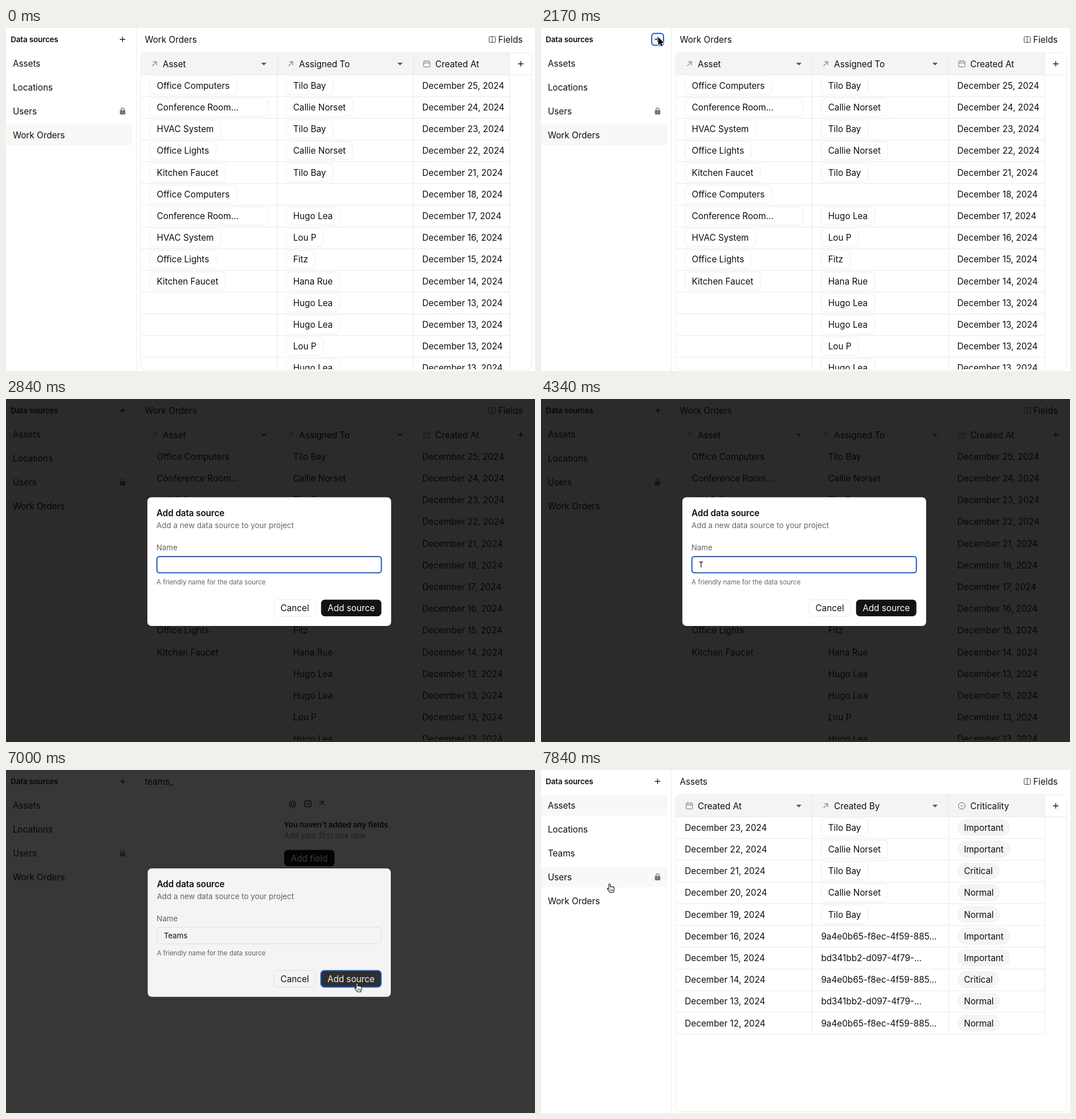
An HTML page with a canvas that plays this animation: 928x603 px, repeating every 8 s.

```html
<!DOCTYPE html>
<html lang="en">
<head>
<meta charset="utf-8">
<title>Data sources</title>
<style>
  html, body { margin: 0; width: 100%; height: 100%; overflow: hidden; background: #fff; }
  canvas { display: block; width: 928px; height: 603px; }
</style>
</head>
<body>
<canvas id="stage"></canvas>
<script>
const W = 928, H = 603, LOOP = 8000;
const dpr = window.devicePixelRatio || 1;
const BODY = 15.28, SMALL = 13.37, TINY = 11.46;
const INK = '#0e0e0d', GRAY = '#656563', ICON = '#737371', LINE = '#efefed', BLUE = '#1b59cc';
const COLS = [236.8, 475.9, 714.8, 883.5];
const TOP = 82, ROW = 38.2, PAD = 15.5, FIRST = 101.2;
const DIM = 0.83, EDGE = 264.1;

const stage = document.getElementById('stage');
const layer = document.createElement('canvas');
for (const c of [stage, layer]) { c.width = W * dpr; c.height = H * dpr; }
const main = stage.getContext('2d'), modal = layer.getContext('2d');
let g = main;

const ASSETS = ['Office Computers', 'Conference Room…', 'HVAC System', 'Office Lights', 'Kitchen Faucet'];
const [P1, P2, P3, P4, P5, P6] = ['Tilo Bay', 'Callie Norset', 'Hugo Lea', 'Lou P', 'Fitz', 'Hana Rue'];
const PEOPLE = [P1, P2, P1, P2, P1, '', P3, P4, P5, P6, P3, P3, P4, P3];
const ORDER_DAYS = [25, 24, 23, 22, 21, 18, 17, 16, 15, 14, 13, 13, 13, 13];
const ASSET_DAYS = [23, 22, 21, 20, 19, 16, 15, 14, 13, 12];
const IDS = ['9a4e0b65-f8ec-4f59-885…', 'bd341bb2-d097-4f79-…'];
const LEVELS = ['Important', 'Important', 'Critical', 'Normal', 'Normal'];
const date = d => `December ${d}, 2024`;

// y is the middle of the capitals
function text(s, x, y, size = BODY, color = INK, weight = 400) {
  g.font = `${weight} ${size}px Inter, sans-serif`;
  g.fillStyle = color;
  g.fillText(s, x, y + size * 0.364);
  return g.measureText(s).width;
}

function widthOf(s) {
  g.font = `400 ${BODY}px Inter, sans-serif`;
  return g.measureText(s).width;
}

function heading(s, x, y, size) {
  g.letterSpacing = '-0.12px';
  text(s, x, y, size, INK, 600);
  g.letterSpacing = '0px';
}

function box(x, y, w, h, r, fill, stroke, lw = 1) {
  g.beginPath();
  g.roundRect(x, y, w, h, r);
  if (fill) { g.fillStyle = fill; g.fill(); }
  if (stroke) { g.strokeStyle = stroke; g.lineWidth = lw; g.stroke(); }
}

function lines(color, lw, ...paths) {
  g.strokeStyle = color;
  g.lineWidth = lw;
  g.beginPath();
  for (const [x, y, ...rest] of paths) {
    g.moveTo(x, y);
    for (let i = 0; i < rest.length; i += 2) g.lineTo(rest[i], rest[i + 1]);
  }
  g.stroke();
}

function circle(x, y, r, color, lw = 1) {
  g.strokeStyle = color;
  g.lineWidth = lw;
  g.beginPath();
  g.arc(x, y, r, 0, Math.PI * 2);
  g.stroke();
}

const plus = (x, y) => lines('#222', 1.4, [x - 4.8, y, x + 4.8, y], [x, y - 4.8, x, y + 4.8]);

const icons = {
  link: (x, y, c = ICON) =>
    lines(c, 1.05, [x - 3.8, y + 3.8, x + 3.8, y - 3.8], [x - 2.6, y - 3.8, x + 3.8, y - 3.8, x + 3.8, y + 2.6]),
  calendar(x, y) {
    box(x - 5.5, y - 4.7, 11, 10.2, 1.4, null, ICON);
    lines(ICON, 1, [x - 5.5, y - 1.5, x + 5.5, y - 1.5], [x - 2.8, y - 6.3, x - 2.8, y - 3.5], [x + 2.8, y - 6.3, x + 2.8, y - 3.5]);
  },
  choice(x, y) {
    circle(x, y, 5.8, GRAY);
    lines(GRAY, 1, [x - 2.4, y - 1, x, y + 1.4, x + 2.4, y - 1]);
  }
};

function lock(x, y) {
  box(x - 4.8, y - 1.6, 9.6, 7.6, 1.4, ICON);
  g.strokeStyle = ICON;
  g.lineWidth = 1.3;
  g.beginPath();
  g.moveTo(x - 2.8, y - 1);
  g.lineTo(x - 2.8, y - 2.6);
  g.arc(x, y - 2.6, 2.8, Math.PI, 0);
  g.lineTo(x + 2.8, y - 1);
  g.stroke();
  lines('#bbb', 1, [x, y + 1, x, y + 3.4]);
}

function sidebar(items, active, hover, ring) {
  lines('#ececea', 1, [228.5, 0, 228.5, H]);
  heading('Data sources', 8.2, 20, SMALL);
  if (ring) box(194.2, 9.4, 20.8, 21.2, 5, '#f5f5f4', BLUE, 2);
  plus(204.5, 20);
  items.forEach((name, i) => {
    const y = 62 + 42 * i;
    if (name === active || name === hover) box(-8, y - 18.3, 230.4, 36.5, 5.5, '#f8f8f7');
    text(name, 11.9, y);
    if (name === 'Users') lock(204.5, y);
  });
}

function pill(s, x, y) {
  if (!s) return;
  const w = s.startsWith('Conf') ? 207.4 : widthOf(s) + 24.4;
  box(x + 0.2, y - 16.2, w, 32, 7.5, '#fff', '#ededeb');
  text(s, x + 12.3, y);
}

function tag(s, x, y) {
  box(x + 0.4, y - 15.2, widthOf(s) + 22.6, 30, 15, '#f4f4f3');
  text(s, x + 11.6, y);
}

const plain = (s, x, y) => text(s, x, y);

// columns: [icon, title, cell painter, value of row i]
function table(title, columns, rows) {
  text(title, 243.4, 20);
  box(847.5, 15, 11, 10.4, 1.6, null, '#444');
  lines('#444', 1, [853, 15, 853, 25.4]);
  text('Fields', 863.6, 20);

  g.save();
  g.beginPath();
  g.roundRect(236.5, 43.5, 685.5, 557, 7);
  g.clip();
  g.fillStyle = '#f4f4f3';
  g.fillRect(236, 43, COLS[3] - 236, TOP - 43);
  const end = TOP + ROW * rows;
  for (let i = 0; i <= rows; i++) {
    const y = TOP + ROW * i + 0.3;
    lines(LINE, 1.5, [236, y, i ? COLS[3] : 922, y]);
  }
  for (const x of COLS.slice(1)) lines(LINE, 1.5, [x, 43, x, end]);
  lines('#e9e9e7', 1, [COLS[1], 43, COLS[1], TOP], [COLS[2], 43, COLS[2], TOP]);

  columns.forEach(([icon, head, paint, value], c) => {
    const x = COLS[c];
    icons[icon](x + 23.4, 63);
    text(head, x + 38.2, 63);
    if (c < 2) {
      const tx = COLS[c + 1] - 23.6;
      g.fillStyle = '#5c5c5a';
      g.beginPath();
      g.moveTo(tx - 4.8, 61);
      g.lineTo(tx + 4.8, 61);
      g.lineTo(tx, 65.8);
      g.fill();
    }
    for (let i = 0; i < rows; i++) paint(value(i), x + PAD, FIRST + ROW * i);
  });
  plus(903, 63);
  g.restore();
  box(236.5, 43.5, 685.5, 557, 7, null, '#ebebe9');
}

const pages = {
  orders: () => table('Work Orders', [
    ['link', 'Asset', pill, i => i < 10 ? ASSETS[i % 5] : ''],
    ['link', 'Assigned To', pill, i => PEOPLE[i]],
    ['calendar', 'Created At', plain, i => date(ORDER_DAYS[i])]
  ], 14),
  assets: () => table('Assets', [
    ['calendar', 'Created At', plain, i => date(ASSET_DAYS[i])],
    ['link', 'Created By', (s, x, y) => (s.includes('-') ? plain : pill)(s, x, y), i => i < 5 ? PEOPLE[i] : IDS[(i - 5) % 2]],
    ['choice', 'Criticality', tag, i => LEVELS[i % 5]]
  ], 10),
  teams() {
    text('teams_', 243.4, 20);
    text('@', 495.8, 59, 14.5);
    box(524, 53.8, 11, 10.8, 2, null, INK, 1.2);
    lines(INK, 1.2, [526.6, 59.2, 528.8, 61.4, 532.6, 56.8]);
    icons.link(553, 59, INK);
    heading("You haven't added any fields", 487.6, 96, SMALL);
    text('Add your first one now', 487.6, 115, SMALL, GRAY);
    box(488, 140.5, 88.4, 28.7, 6.5, '#101010');
    text('Add field', 499.6, 155, BODY, '#fff');
  }
};

const panel = fill => box(248, 172.8, 427.6, 226.2, 7, fill);

function dialog(value, caret, focused, hover, pressed) {
  panel('#fff');
  heading('Add data source', EDGE, 200.2, BODY);
  text('Add a new data source to your project', EDGE, 222.2, SMALL, GRAY);
  text('Name', EDGE - 0.3, 261.4, SMALL, GRAY);
  if (focused) box(264.7, 277, 393.8, 28.6, 4.5, '#fff', BLUE, 2);
  else box(264.5, 276.5, 394, 29.2, 5, null, '#e8e8e6');
  const w = text(value, 276.4, 291.2, SMALL);
  if (caret) lines('#111', 1, [277 + w, 283, 277 + w, 299]);
  text('A friendly name for the data source', EDGE, 321.6, TINY, GRAY);
  box(470.3, 352.7, 73.4, 29.2, 6.5, '#fff', '#e9e9e7');
  text('Cancel', 481.6, 367.3);
  box(552.7, 352.8, 105.8, 29.2, 6.5, hover ? '#2f2f2e' : '#131312');
  if (pressed) box(552.7, 353, 105.8, 28.8, 6, null, BLUE, 2);
  text('Add source', 564.2, 367.3, BODY, '#fff');
}

const ARROW = new Path2D('M0 0V14.4L3.3 11.4L5.4 16.4L7.7 15.4L5.6 10.5H10Z');
const HAND = new Path2D('M3.5 10V2a1.3 1.3 0 0 1 2.6 0v4.3c.2-1.2 2.2-1.1 2.4.1c.4-1 2.2-.8 2.3.4c.5-.8 2-.4 2 .8v3.2c0 2.5-1.2 3-1.4 5.2H5.4C5 14.6 3 13 1.2 10.2C.2 8.6 1.8 7.6 3.5 10z');

function cursor(kind, x, y) {
  g.save();
  g.translate(x, y);
  g.lineJoin = 'round';
  if (kind === 'arrow') {
    g.strokeStyle = '#fff';
    g.lineWidth = 2;
    g.stroke(ARROW);
    g.fillStyle = '#000';
    g.fill(ARROW);
  } else {
    g.fillStyle = '#fff';
    g.fill(HAND);
    g.strokeStyle = '#111';
    g.lineWidth = 1.1;
    g.stroke(HAND);
    lines('#111', 0.9, [6.3, 10.5, 6.3, 13.5], [8.4, 10.5, 8.4, 13.5], [10.4, 10.5, 10.4, 13.5]);
  }
  g.restore();
}

// last entry whose start time has passed
const at = (list, t) => list.filter(e => e[0] <= t).pop();

const FADE = [[0, 0], [2340, 0.9], [2500, 1], [7000, 0.945], [7170, 0]];
const INPUT = [
  [0, '', 0], [2340, '', 1], [2840, '', 0], [3340, '', 1], [3840, 'T', 1], [4340, 'T', 0],
  [4500, 'Te', 1], [4840, 'Tea', 1], [5170, 'Team', 1], [5670, 'Teams', 1], [6170, 'Teams', 0]
];
const POINTER = [
  [0], [1840, 'arrow', 205.6, 15.8], [2670], [6000, 'arrow', 555, 307], [6170, 'arrow', 574, 332],
  [6340, 'hand', 601, 362], [6500, 'hand', 611, 374], [7170, 'arrow', 611, 368],
  [7500, 'hand', 153, 144], [7840, 'hand', 115.5, 199.3]
];

function pointer(t) {
  if (t < 840 || t >= 1840) return at(POINTER, t).slice(1);
  const k = 1 - (t - 840) / 1000;
  const e = k * k * (3 - 2 * k);
  return ['arrow', 205.6 + 135 * e, 15.8 + 235 * e];
}

// six pictures a second
function tick(t) {
  const r = t % 500;
  return t - r + (r < 170 ? 0 : r < 340 ? 170 : 340);
}

// faint lines and fills wash out to white before the page is dimmed
function dim(a) {
  g.globalCompositeOperation = 'color-dodge';
  g.fillStyle = '#161616';
  g.fillRect(0, 0, W, H);
  g.globalCompositeOperation = 'source-over';
  g.fillStyle = `rgba(0,0,0,${DIM * a})`;
  g.fillRect(0, 0, W, H);
}

function zoom(s) {
  g.translate(461.8, 286);
  g.scale(s, s);
  g.translate(-461.8, -286);
}

function overlay(t, a) {
  const s = 0.95 + 0.05 * a;
  const shade = 255 * (1 - DIM * a);
  const [, value, caret] = at(INPUT, t);
  dim(a);
  g.save();
  zoom(s);
  panel(`rgb(${shade},${shade},${shade})`);
  g.restore();

  g = modal;
  g.setTransform(1, 0, 0, 1, 0, 0);
  g.clearRect(0, 0, layer.width, layer.height);
  g.scale(dpr, dpr);
  zoom(s);
  dialog(value, caret, t < 6670, t >= 6340, t >= 6670);

  g = main;
  g.globalAlpha = a;
  g.drawImage(layer, 0, 0, W, H);
  g.globalAlpha = 1;
}

function draw(t) {
  g = main;
  g.setTransform(dpr, 0, 0, dpr, 0, 0);
  g.fillStyle = '#fff';
  g.fillRect(0, 0, W, H);

  const done = t >= 7170;
  const items = ['Assets', 'Locations', ...(done ? ['Teams'] : []), 'Users', 'Work Orders'];
  const hover = t >= 7840 ? 'Users' : t >= 7500 ? 'Teams' : '';
  sidebar(items, done ? 'Assets' : 'Work Orders', hover, t >= 2170 && t < 2340);
  pages[done ? 'assets' : t >= 7000 ? 'teams' : 'orders']();

  const a = at(FADE, t)[1];
  if (a) overlay(t, a);

  const p = pointer(t);
  if (p.length) cursor(...p);
}

function loop() {
  draw(tick(performance.now() % LOOP));
  requestAnimationFrame(loop);
}
loop();
</script>
</body>
</html>
```
